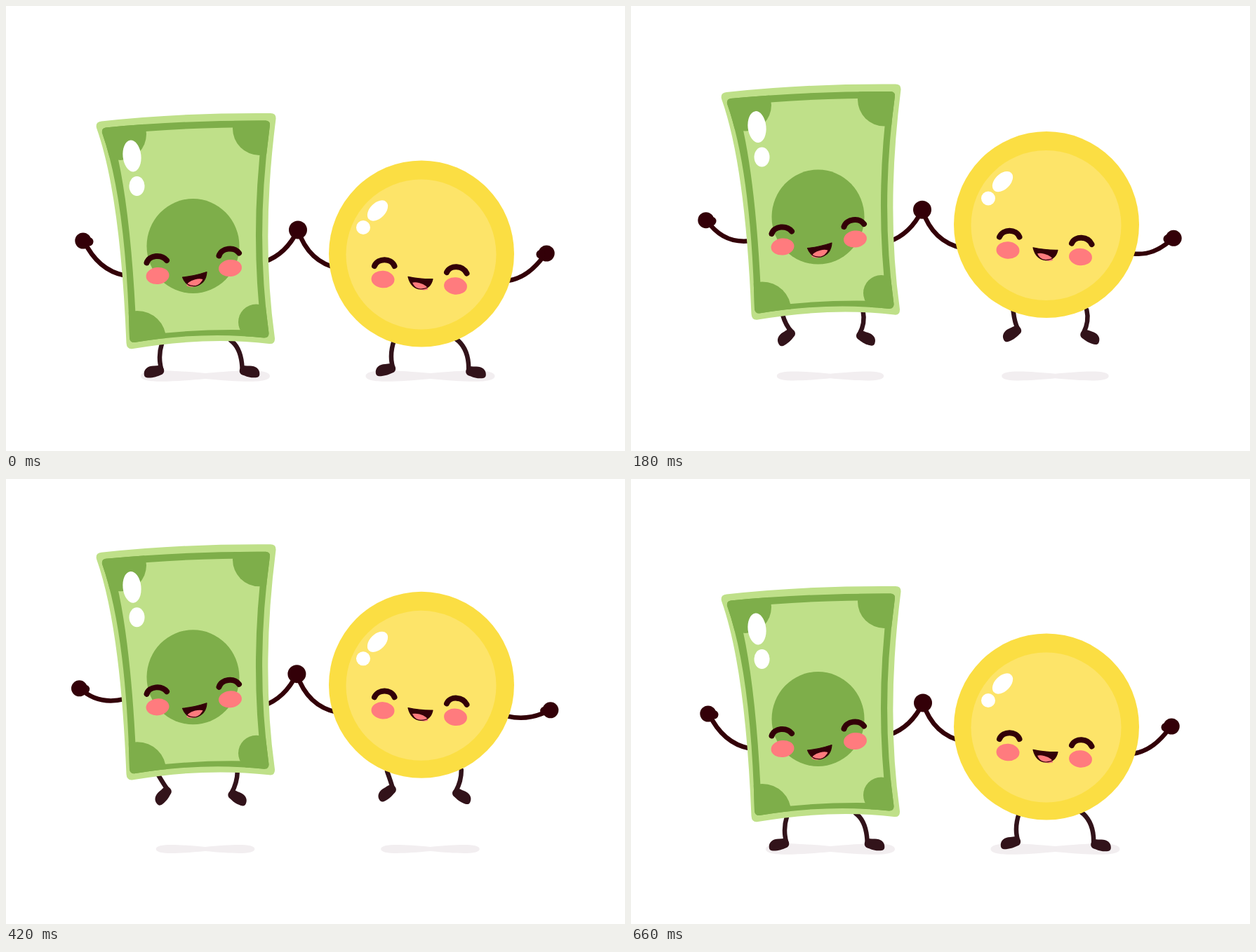
Write an HTML page that moves like this. It is 882x635 px and loops after 0.69 s.

```html
<!DOCTYPE html>
<html lang="en">
<head>
<meta charset="utf-8">
<title>Happy money</title>
<style>
  html, body { margin: 0; width: 100%; height: 100%; overflow: hidden; background: #fff; }
  svg { display: block; width: 100vw; height: 100vh; }
  .limb { fill: none; stroke: #330008; stroke-width: 6.5; stroke-linecap: round; }
  .leg { stroke: #32131a; }
  .hand { fill: #330008; }
  .foot { fill: #32131a; }
  .shadow { fill: #f2eef0; }
  .brow { fill: none; stroke: #330008; stroke-width: 8; stroke-linecap: round; }
  .mouth { fill: #330008; }
  .lip { fill: none; stroke: #330008; stroke-width: 1.2; stroke-linejoin: round; }
  .pink { fill: #ff7b7e; }
  .light { fill: #bfe089; }
  .dark { fill: #7eae4a; }
  .shine { fill: #fff; }
</style>
</head>
<body>
<svg viewBox="0 0 882 635" xmlns="http://www.w3.org/2000/svg">
  <defs>
    <path id="frame" d="M142 173.5Q250 163 370 163.5Q376.5 164 376 170Q355 325 374.5 467Q374.5 474 368 473.5Q280 464 183 480Q177 480.5 176 474Q171 278 137 181Q136 174.5 142 173.5Z"/>
    <path id="billMouth" d="M251.5 387Q268 385.500 286 379.5Q285 395.500 271 399.3Q257 401.5 251.5 387Z"/>
    <path id="coinMouth" d="M573 386.300Q590 390 608 389.7Q605 404 591 404Q577 403 573 386.3Z"/>
    <clipPath id="inFrame"><use href="#frame"/></clipPath>
    <clipPath id="inBillMouth"><use href="#billMouth"/></clipPath>
    <clipPath id="inCoinMouth"><use href="#coinMouth"/></clipPath>
  </defs>

  <g id="back"></g>

  <g id="bill">
    <path class="light" d="M136 164.5Q250 152 377 153Q385 153 384.5 161Q363 330 383 474Q383.5 483 375 482Q285 471.5 181 489Q172 490.5 171.5 481Q163 270 129 174Q127 165.5 136 164.5Z"/>
    <use class="dark" href="#frame"/>
    <path class="light" d="M151 183Q250 173 366 173Q347 320 364 463Q280 459 186 471Q178 275 151 183Z"/>
    <g class="dark" clip-path="url(#inFrame)">
      <circle cx="163" cy="183" r="37"/>
      <circle cx="361" cy="175" r="38"/>
      <ellipse cx="187" cy="475" rx="41" ry="40"/>
      <circle cx="356.5" cy="451" r="25.5"/>
    </g>
    <ellipse class="dark" cx="266.5" cy="342.5" rx="66" ry="67.5"/>
    <g class="shine">
      <ellipse cx="179.5" cy="214" rx="13" ry="22.5" transform="rotate(-6 179.5 214)"/>
      <ellipse cx="186.5" cy="257" rx="11" ry="14"/>
    </g>
    <g class="pink">
      <ellipse cx="216" cy="385" rx="16.5" ry="12" transform="rotate(-6 216 385)"/>
      <ellipse cx="319.5" cy="374" rx="16.5" ry="12" transform="rotate(-6 319.5 374)"/>
    </g>
    <path class="brow" d="M200.5 366.5C204 355 222 354 229 363M303.5 356.5C307 345 325 343 332 352.500"/>
    <use class="mouth" href="#billMouth"/>
    <ellipse class="pink" cx="271" cy="396.500" rx="14" ry="6.5" transform="rotate(-14 271 396.5)" clip-path="url(#inBillMouth)"/>
    <use class="lip" href="#billMouth"/>
  </g>

  <g id="coin">
    <ellipse cx="592" cy="353.5" rx="132" ry="133" fill="#fbde43"/>
    <circle cx="591.5" cy="354.5" r="107" fill="#fde469"/>
    <g class="shine">
      <ellipse cx="529.5" cy="292" rx="17.5" ry="11" transform="rotate(-45 529.5 292)"/>
      <circle cx="509" cy="316" r="10"/>
    </g>
    <g class="pink">
      <ellipse cx="537" cy="390" rx="16.5" ry="12.2" transform="rotate(4 537 390)"/>
      <ellipse cx="640.5" cy="399.5" rx="16.5" ry="12.2" transform="rotate(6 640.5 399.5)"/>
    </g>
    <path class="brow" d="M525 371C530 359 549 359.500 553.5 371M628 380C633 369 651 370 656.5 381.500"/>
    <use class="mouth" href="#coinMouth"/>
    <ellipse class="pink" cx="587.5" cy="401.500" rx="14" ry="6.5" transform="rotate(14 587.5 401.5)" clip-path="url(#inCoinMouth)"/>
    <use class="lip" href="#coinMouth"/>
  </g>

  <circle id="joint" class="hand" r="13"/>
</svg>

<script>
const STEP = 30, LOOP = 690, CYCLE = 660, JUMP = 73;
const KEYS = [0, 120, 240, 360, 480, 540];
const N = KEYS.length;
const FOOT = "M-14.5 2.5C-14.5-5-8-9 0-8.5C5-8 9-9.5 12-6.5C15.5-3 15 2.5 11 4.5C6 6 2 8-6 8C-11.5 8-14.5 7-14.5 2.5Z";
const SHADOW = "M-92 0C-92-11-50-8.5 0-4C50-8.5 92-11 92 0C92 11 50 8.5 0 4C-50 8.5-92 11-92 0Z";

const $ = id => document.getElementById(id);
const back = $("back");

function add(tag, attrs) {
  const el = document.createElementNS("http://www.w3.org/2000/svg", tag);
  set(el, attrs);
  return back.appendChild(el);
}
function set(el, attrs) {
  for (const k in attrs) el.setAttribute(k, attrs[k]);
}

// Eased up and eased down again, half a cycle each.
function lift(t) {
  const u = 1 - Math.abs(1 - 2 * t / CYCLE);
  return -JUMP * u * u * (3 - 2 * u);
}

// Smooth periodic curve through the key poses.
function at(v, t) {
  t %= CYCLE;
  const time = i => KEYS[(i + N) % N] + CYCLE * Math.floor(i / N);
  const val = i => v[(i + N) % N];
  const slope = i => (val(i + 1) - val(i - 1)) / (time(i + 1) - time(i - 1));
  let i = N - 1;
  while (KEYS[i] > t) i--;
  const d = time(i + 1) - time(i), u = (t - time(i)) / d;
  const u2 = u * u, u3 = u2 * u;
  return (2 * u3 - 3 * u2 + 1) * val(i) + (u3 - 2 * u2 + u) * d * slope(i)
       + (3 * u2 - 2 * u3) * val(i + 1) + (u3 - u2) * d * slope(i + 1);
}
// Heights are eased relative to the jumping body.
const atY = (v, t) => lift(t) + at(v.map((y, i) => y - lift(KEYS[i])), t);

const quad = (a, c, b) => `M${a}Q${c} ${b}`;
// Quadratic curve whose middle passes through m.
const through = (a, m, b) => quad(a, m.map((p, i) => 2 * p - (a[i] + b[i]) / 2), b);

const shadowSize = [1, .908, .755, .707, .848, .935];
const shadows = [284, 604.5].map(x => ({ x, el: add("path", { class: "shadow", d: SHADOW }) }));

const legs = [
  { side: 1, hip: 482, hipX: [222, 218, 215, 218, 216, 219],
    kneeX: [219, 220, 223, 228, 220, 219.5], kneeY: [500, 478, 431, 418, 459, 481],
    x: [211, 218.5, 224, 227, 220.5, 217.5], y: [522, 497, 449.5, 433.5, 479.5, 505],
    turn: [-4, -23, -42, -52, -29, -16] },
  { side: -1, hip: 477, hipX: [320, 329, 331, 330, 329, 325],
    kneeX: [332, 332.5, 329, 325, 331, 333], kneeY: [493, 474, 431, 419, 455, 477],
    x: [347, 339, 330.5, 326, 335, 340], y: [522, 497, 452.5, 438.5, 480, 505],
    turn: [3, 13, 25, 30, 16, 9] },
  { side: 1, hip: 477, hipX: [553, 547, 543, 542, 545, 548.5],
    kneeX: [549, 548, 547, 548, 547, 548], kneeY: [497, 474, 428, 414, 454, 478],
    x: [541, 543, 543, 543.5, 543, 544], y: [519.5, 492.5, 444.5, 430.5, 474.5, 501],
    turn: [-6, -19, -31, -35, -24, -15] },
  { side: -1, hip: 475, hipX: [641, 648.5, 649, 648, 649, 644.5],
    kneeX: [655, 653, 647, 643, 652, 654], kneeY: [493, 472, 429, 416, 453, 475],
    x: [669.5, 660, 648.5, 644.5, 656, 662], y: [523, 496.5, 450, 435.5, 478.5, 504.5],
    turn: [3, 12, 25, 30, 16, 8] }
].map(leg => ({
  ...leg,
  line: add("path", { class: "limb leg" }),
  foot: add("path", { class: "foot", d: FOOT })
}));

const arms = [
  { side: 1, root: 169, bend: 131, x: [111, 109, 107, 105, 107, 108.5],
    y: [335, 321, 292, 290, 311.5, 323.5],
    bendY: [377, 358, 322, 312, 340, 358], rootY: [384.5, 357, 315, 300, 335.5, 357.5] },
  { side: -1, root: 715, bend: 745, x: [769, 771, 773, 775.5, 773, 771],
    y: [353, 344, 320, 321.5, 341, 350.5],
    bendY: [388, 374, 342, 337, 359, 374], rootY: [392, 371.5, 336.5, 327.5, 355.5, 373] }
].map(arm => ({
  ...arm,
  line: add("path", { class: "limb" }),
  palm: add("circle", { class: "hand", r: 11.5 }),
  thumb: add("circle", { class: "hand", r: 6.3 })
}));

const jointX = [416, 415.5, 414.5, 414, 415, 415.5];
const jointY = [319.5, 306, 276.5, 270, 291, 305];
const held = add("path", { class: "limb", d: "M-48 45.5Q-17 35 0 0Q15 46 58 55" });
const joint = $("joint");

function draw(t) {
  const up = lift(t % CYCLE);
  for (const id of ["bill", "coin"]) set($(id), { transform: `translate(0 ${up})` });

  const s = at(shadowSize, t);
  for (const { x, el } of shadows) set(el, { transform: `translate(${x} 528) scale(${s})` });

  for (const leg of legs) {
    const x = at(leg.x, t), y = atY(leg.y, t), turn = at(leg.turn, t);
    const r = turn * Math.PI / 180, hx = 10.5 * leg.side, hy = -3;
    const heel = [x + hx * Math.cos(r) - hy * Math.sin(r), y + hx * Math.sin(r) + hy * Math.cos(r)];
    const knee = [at(leg.kneeX, t), atY(leg.kneeY, t)];
    set(leg.line, { d: through([at(leg.hipX, t), leg.hip + up], knee, heel) });
    set(leg.foot, { transform: `translate(${x} ${y}) rotate(${turn}) scale(${leg.side} 1)` });
  }

  for (const arm of arms) {
    const x = at(arm.x, t), y = atY(arm.y, t);
    set(arm.line, { d: quad([arm.root, atY(arm.rootY, t)], [arm.bend, atY(arm.bendY, t)], [x, y]) });
    set(arm.palm, { cx: x - 1.2 * arm.side, cy: y });
    set(arm.thumb, { cx: x + 7.2 * arm.side, cy: y + 1.2 });
  }

  const move = `translate(${at(jointX, t)} ${atY(jointY, t)})`;
  set(held, { transform: move });
  set(joint, { transform: move });
}

const start = performance.now();
function tick() {
  const t = (performance.now() - start) % LOOP;
  draw(Math.floor(t / STEP) * STEP);
  requestAnimationFrame(tick);
}
tick();
</script>
</body>
</html>
```
